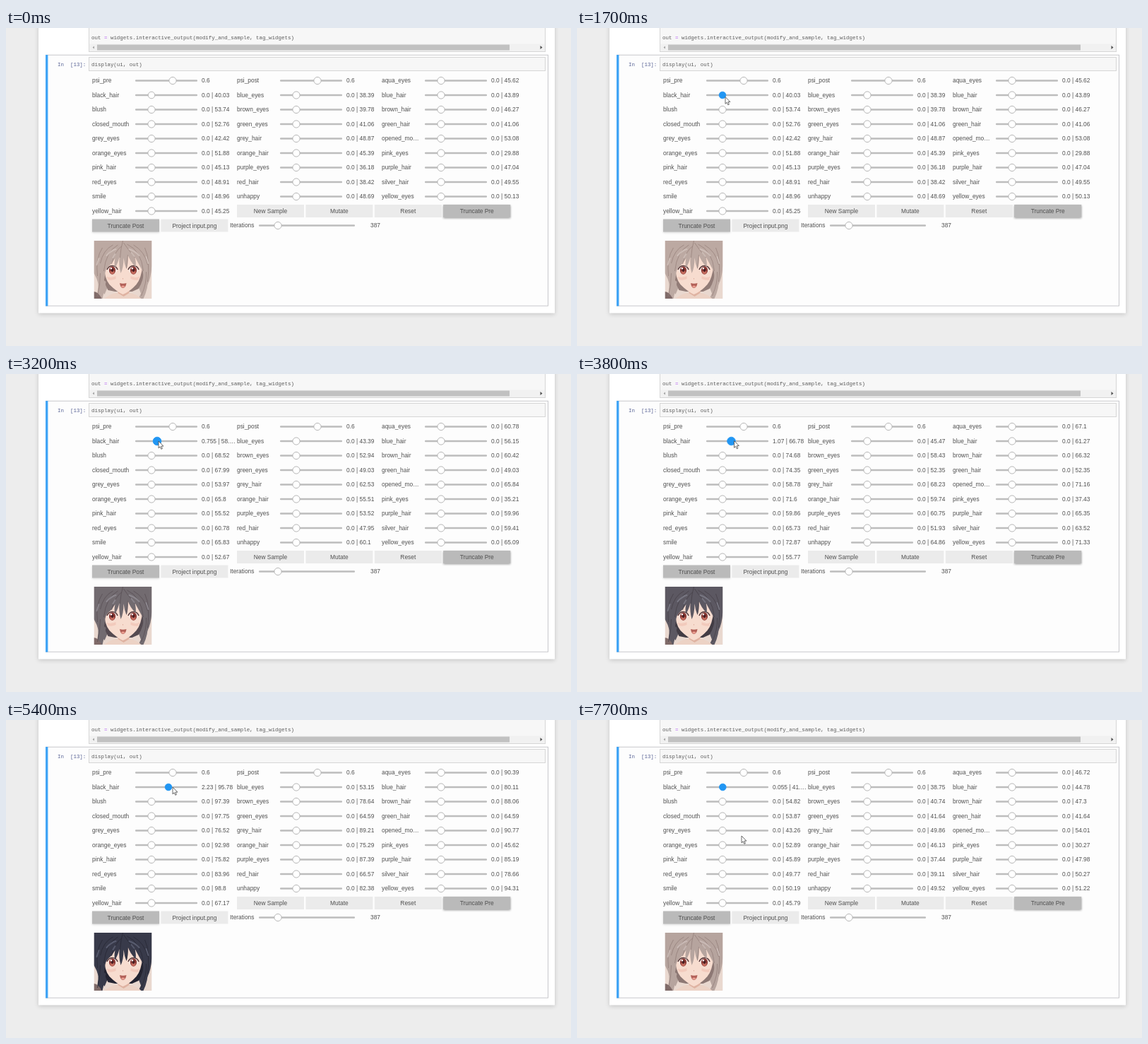
Animation, 800 px wide and 450 px high, one loop 8 s. Source, as an HTML page:

```html
<!DOCTYPE html>
<html lang="en">
<head>
<meta charset="utf-8">
<title>Tag sliders</title>
<style>
html, body { margin: 0; width: 100%; height: 100%; overflow: hidden; background: #ededed; }
svg { display: block; }
text { font: 8.4px "Liberation Sans", Arial, sans-serif; fill: #505050; white-space: pre; }
.code { font: 7.47px "Liberation Mono", monospace; fill: #5c5c5c; }
.mid { text-anchor: middle; }
.knob { fill: #fff; stroke: #b0b0b0; stroke-width: .9; }
.knob.on { fill: #2196f3; stroke: #2196f3; }
.hair { fill: var(--hair); }
.dark { fill: var(--dark); }
.line { fill: none; stroke: var(--dark); stroke-width: .9; opacity: .75; }
.shine { fill: none; stroke: var(--shine); stroke-width: 2; stroke-linecap: round; opacity: .75; }
</style>
</head>
<body>
<svg id="stage" width="100%" height="100%" viewBox="0 0 800 450">
  <defs>
    <filter id="soft" x="-20%" y="-20%" width="140%" height="150%"><feGaussianBlur stdDeviation="3"/></filter>
    <filter id="lift" x="-10%" y="-40%" width="120%" height="200%"><feGaussianBlur stdDeviation="1.4"/></filter>
    <filter id="blur"><feGaussianBlur stdDeviation=".5"/></filter>
    <clipPath id="crop"><rect width="82" height="82"/></clipPath>
    <g id="eye">
      <path d="M-7 0Q-5 -6 0 -6Q6 -6 7 0Q5 5 0 6Q-5 5 -7 0Z" fill="#f7e6df"/>
      <ellipse rx="4.600" ry="5.800" fill="#8b3a35"/>
      <ellipse cy="2.500" rx="3" ry="2.800" fill="#c46a5c"/>
      <ellipse cy="-.5" rx="1.900" ry="2.600" fill="#4a1d21"/>
      <circle cx="-1.600" cy="-2.800" r="1.200" fill="#fff"/>
      <path d="M-7.500 -1Q-5 -6.500 0 -6.500Q5.500 -6.500 7.500 -1" fill="none" stroke="#553a3c" stroke-width="1.600"/>
    </g>
  </defs>

  <rect width="800" height="450" fill="#ededed"/>
  <rect x="46" y="-10" width="731" height="415" fill="#000" opacity=".17" filter="url(#soft)"/>
  <rect x="46" y="-10" width="731" height="413.500" fill="#fff"/>

  <rect x="117.500" y="-5" width="646" height="38.500" fill="#f7f7f7" stroke="#d6d6d6"/>
  <text class="code" x="121" y="16">out <tspan fill="#b45cf0">=</tspan> widgets.interactive_output(modify_and_sample, tag_widgets)</text>
  <rect x="118" y="22.500" width="645" height="10.500" fill="#f1f1f1"/>
  <rect x="129" y="23.500" width="584" height="8" fill="#c1c1c1"/>
  <path d="M125 25.500V29.500L122.500 27.500Z" fill="#a3a3a3"/>
  <path d="M756.500 25V30L759.500 27.500Z" fill="#505050"/>

  <rect x="56.500" y="38.200" width="711" height="355" fill="#fdfdfd" stroke="#c2c2c6" stroke-width=".9"/>
  <rect x="56" y="38" width="3.400" height="355.500" fill="#42a5f5"/>
  <text class="code" x="73" y="54" style="fill:#5a6496">In  [13]:</text>
  <rect x="117.500" y="41.500" width="646" height="19" fill="#f7f7f7" stroke="#d6d6d6"/>
  <text class="code" x="121" y="54">display(ui, out)</text>

  <g id="ui"></g>

  <g id="face" transform="translate(124.500 301)" clip-path="url(#crop)">
    <g filter="url(#blur)">
      <rect width="82" height="82" fill="#e9d8cf"/>
      <path class="hair" d="M0 0H82V36Q81 52 76 62L67 76L61 60H22L15 76Q7 66 4 54L0 46Z"/>
      <path class="dark" d="M12 38Q13 58 20 70L30 72H54L63 68Q71 56 71 38L62 26H20Z"/>
      <path class="hair" d="M5 50Q8 66 3 82H12Q15 70 17 58ZM70 52Q71 68 63 82H70Q77 68 77 48Z"/>
      <path d="M34 66H50V82H34Z" fill="#dfb3a2"/>
      <path d="M15 82Q24 74 34 74L42 79L50 74Q60 75 67 82Z" fill="#ecd2c5"/>
      <path d="M0 72Q6 72 11 82H0Z" fill="#806b69"/>
      <path d="M14 34Q15 54 22 62Q32 72 41 76Q51 72 60 62Q67 54 69 34L54 16H28Z" fill="#f7dccf"/>
      <path d="M18 51Q25 53 31 50V54Q25 57 20 55ZM52 50Q60 54 65 50L62 56Q56 56 52 54Z" fill="#f1bfb1" opacity=".6"/>
      <use href="#eye" x="26" y="42"/>
      <use href="#eye" x="56" y="42"/>
      <path d="M36.500 60Q41 61.500 46 60Q45 67 41 67Q37.500 67 36.500 60Z" fill="#b26058"/>
      <path d="M38.500 64.500Q41 62.500 44 64.500Q43 66.500 41 66.500Q39.500 66.500 38.500 64.500Z" fill="#ea9d90"/>
      <path d="M41 53V54.500" stroke="#d9a091" stroke-width=".8"/>
      <path class="hair" d="M7 44Q10 15 40 5Q70 12 77 42Q77 56 73 64Q70 54 69 43Q64 34 58 23Q60 31 59 37Q51 29 48 20Q49 32 46 40Q43 33 42 24Q42 38 38 46Q35 35 36 23Q34 32 30 38Q28 33 30 25Q26 32 20 37Q17 40 16 45Q15 57 11 66Q7 56 7 44Z"/>
      <path class="line" d="M41 0Q38 10 37 24M42 3Q48 12 58 24M39 8Q30 14 25 33M34 6Q17 15 14 43M47 5Q67 14 70 43M48 20Q47 31 46 39M12 10Q2 25 5 50M72 10Q80 27 76 58M9 46Q9 62 5 78M74 44Q75 60 67 78M27 6Q13 13 9 32M56 6Q72 15 76 34"/>
      <path class="shine" d="M18 21Q24 14 31 12M50 12Q59 15 64 21M7 25L4 34M74 23L77 32M30 19L27 24M53 17L57 22"/>
    </g>
  </g>
  <path id="cursor" d="M0 0V9.800L2.200 7.800L3.800 11.300L5.400 10.600L3.900 7.100H6.900Z" fill="#fff" stroke="#444" stroke-width=".8"/>
</svg>
<script>
const LOOP = 8000, STEP = 100, PEAK = 2.23;
const $ = id => document.getElementById(id);

// name, score at 0, score at PEAK
const tags = `aqua_eyes 45.62 90.39,black_hair 40.03 95.78,blue_eyes 38.39 53.15,blue_hair 43.89 80.11,
blush 53.74 97.39,brown_eyes 39.78 78.64,brown_hair 46.27 88.06,closed_mouth 52.76 97.75,
green_eyes 41.06 64.59,green_hair 41.06 64.59,grey_eyes 42.42 76.52,grey_hair 48.87 89.21,
opened_mo… 53.08 90.77,orange_eyes 51.88 92.98,orange_hair 45.39 75.29,pink_eyes 29.88 45.62,
pink_hair 45.13 75.82,purple_eyes 36.18 87.39,purple_hair 47.04 85.19,red_eyes 48.91 83.96,
red_hair 38.42 66.57,silver_hair 49.55 78.66,smile 48.96 98.8,unhappy 48.69 82.38,
yellow_eyes 50.13 94.31,yellow_hair 45.25 67.17`.split(',').map(s => s.trim().split(' '));

function add(name, attrs, text) {
  const el = document.createElementNS('http://www.w3.org/2000/svg', name);
  for (const k in attrs) el.setAttribute(k, attrs[k]);
  if (text) el.textContent = text;
  return $('ui').appendChild(el);
}

function slider(x, y, width, knobX) {
  add('rect', { x, y: y - 1.3, width, height: 2.6, rx: 1, fill: '#bdbdbd' });
  return add('circle', { cx: knobX, cy: y, r: 5.1, class: 'knob' });
}

function row(i, name, offset, value) {
  const x = 122 + 205 * (i % 3), y = 74.5 + 20.5 * Math.floor(i / 3);
  add('text', { x, y: y + 2.7 }, name);
  return {
    knob: slider(x + 61, y, 88, x + offset),
    out: add('text', { x: x + 155, y: y + 2.7 }, value)
  };
}

function button(x, y, label, shadow) {
  const box = { x, y, width: 95, height: 18 };
  if (shadow) add('rect', { ...box, y: y + 1.2, fill: '#000', opacity: shadow, filter: 'url(#lift)' });
  add('rect', { ...box, fill: shadow ? '#bababa' : '#ebebeb' });
  add('text', { x: x + 47.5, y: y + 12, class: 'mid' }, label);
}

row(0, 'psi_pre', 114, '0.6');
row(1, 'psi_post', 114, '0.6');
const rows = tags.map(([name, lo, hi], i) => ({ ...row(i + 2, name, 84), lo: +lo, hi: +hi }));
const active = rows[1];

['New Sample', 'Mutate', 'Reset'].forEach((s, i) => button(327 + 97.4 * i, 250, s));
button(619.2, 250, 'Truncate Pre', .38);
button(122, 270.5, 'Truncate Post', .15);
button(219.4, 270.5, 'Project input.png');
add('text', { x: 317, y: 282.2 }, 'Iterations');
slider(358, 279.5, 136, 385);
add('text', { x: 516, y: 282.2 }, '387');

// Tracks of [time, ...values]
const pointer = [[700, 598, 64], [1500, 209, 97.5], [1700, 210, 97.5], [2400, 215, 96], [2900, 216, 95],
  [3200, 216, 95], [4400, 229, 94], [5000, 236, 95], [5400, 236, 95], [6100, 206, 97],
  [6800, 206, 97], [7500, 236, 162], [7700, 233, 164]];
const drag = [[1700, 206], [2400, 213], [2900, 214], [3200, 214], [4400, 223], [5000, 230], [6200, 230], [6300, 206.3]];
const scores = [[0, 0], [2500, .3], [2700, .55], [2900, .755], [3400, .9], [3700, 1.07], [4000, 1.25],
  [4300, 1.44], [4600, 1.74], [4900, 2.05], [5100, PEAK], [6700, .055]];

function along(track, t) {
  const n = track.findIndex(p => p[0] > t);
  if (n === 0) return track[0].slice(1);
  if (n < 0) return track[track.length - 1].slice(1);
  const a = track[n - 1], b = track[n], k = (t - a[0]) / (b[0] - a[0]);
  return a.slice(1).map((v, i) => v + (b[i + 1] - v) * k);
}

const held = (track, t) => track.reduce((v, p) => p[0] <= t ? p[1] : v, 0);
const mix = (a, b, k) => `rgb(${a.map((v, i) => Math.round(v + (b[i] - v) * k))})`;
const short = s => s.length > 12 ? s.slice(0, 11) + '…' : s;

function draw(now) {
  const t = Math.floor(now % LOOP / STEP) * STEP;
  const v = held(scores, t);
  for (const r of rows) {
    const score = Math.round((r.lo + (r.hi - r.lo) * v / PEAK) * 100) / 100;
    r.out.textContent = r === active && v ? short(`${v} | ${score.toFixed(2)}`) : `0.0 | ${score}`;
  }

  const pressed = t >= 1800 && t < 5300;
  active.knob.setAttribute('class', t >= 1600 ? 'knob on' : 'knob');
  active.knob.setAttribute('cx', along(drag, t)[0]);
  active.knob.setAttribute('r', pressed ? 5.8 : 4.8);

  // The picture arrives a little after the scores
  const lag = t >= 6700 ? 300 : 100;
  const k = 1 - (1 - held(scores, Math.max(0, t - lag)) / PEAK) ** 2;
  const face = $('face').style;
  face.setProperty('--hair', mix([188, 169, 162], [56, 58, 74], k));
  face.setProperty('--dark', mix([146, 124, 119], [36, 36, 49], k));
  face.setProperty('--shine', mix([213, 198, 191], [98, 102, 122], k));

  const [x, y] = along(pointer, t);
  $('cursor').setAttribute('transform', `translate(${x} ${y})`);
  $('cursor').style.display = t < 700 ? 'none' : '';
}

const start = performance.now();
function tick() {
  draw(performance.now() - start);
  requestAnimationFrame(tick);
}
tick();
</script>
</body>
</html>
```
